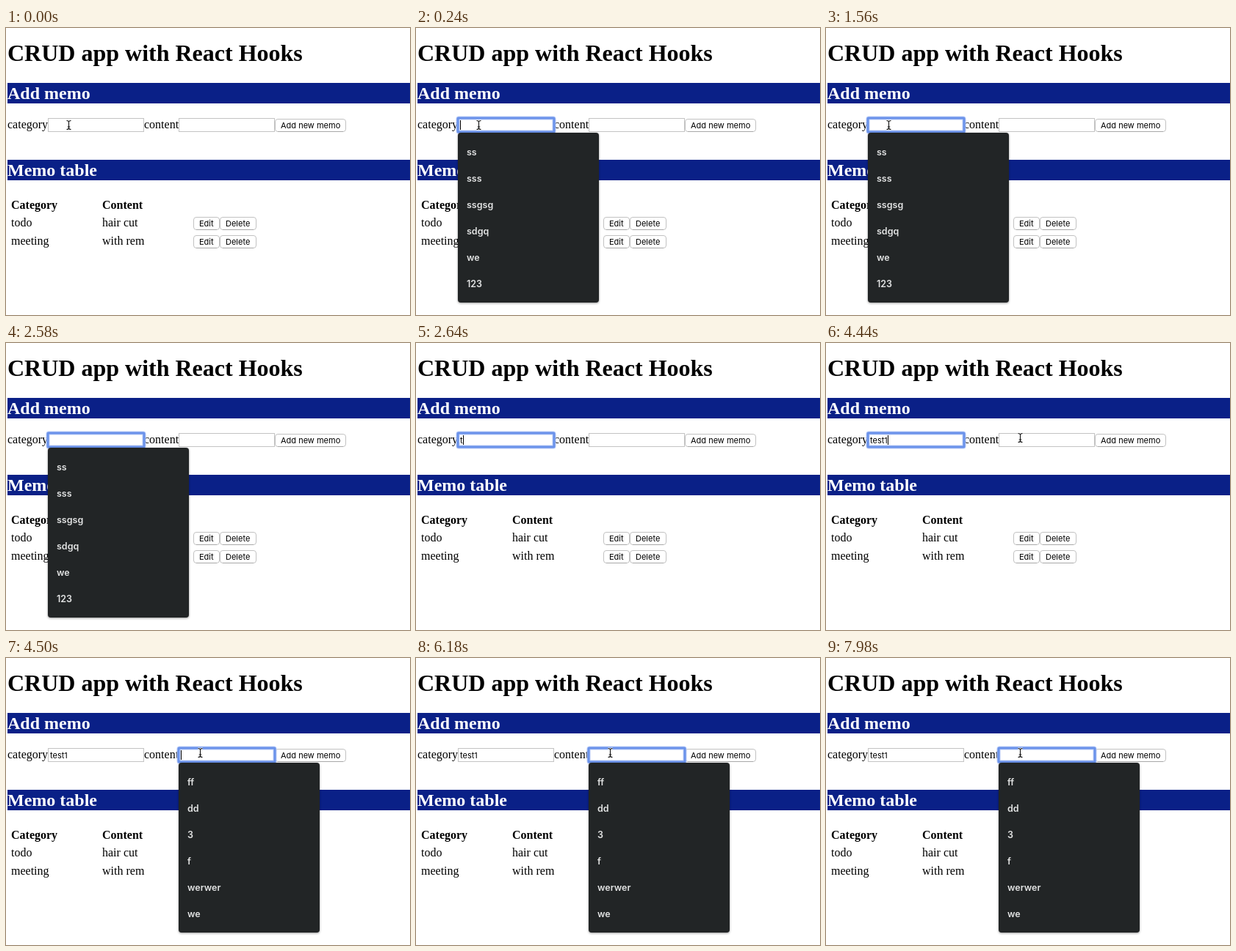
These frames come from a looping animation (550x392 px, 8000 ms). An HTML page:

```html
<!DOCTYPE html>
<html lang="en">
<head>
<meta charset="utf-8">
<title>Memo app</title>
<style>
html, body { margin: 0; width: 550px; height: 392px; overflow: hidden; background: #fff; }
svg { display: block; }
text { white-space: pre; }
.serif { font: 16px "Liberation Serif", Times, serif; }
.bold { font-weight: 700; }
.h1 { font-size: 32px; }
.h2 { font-size: 24px; fill: #fff; }
.bar { fill: #0a2087; }
.ui { font: 11px Inter, "Open Sans", sans-serif; }
.item { font: 600 12.5px Inter, "Open Sans", sans-serif; fill: #e2e3e3; }
.field { fill: #fff; stroke: #c3c3c3; }
.button { fill: #fff; stroke: #c2c2c2; }
.edge { stroke: #a8a8a8; }
.halo { fill: none; stroke: #b9ccf7; stroke-width: 5; }
.ring { fill: none; stroke: #6a92ea; stroke-width: 3; }
.panel { fill: #222526; filter: drop-shadow(0 1px 1.5px rgba(0, 0, 0, .4)); }
.beam { fill: none; stroke: #fff; stroke-width: 2.6; }
.beam + .beam { stroke: #111; stroke-width: 1.1; }
</style>
</head>
<body>
<svg id="stage" width="550" height="392" viewBox="0 0 550 392">
  <g class="serif">
    <text class="bold h1" x="2" y="45">CRUD app with React Hooks</text>
    <rect class="bar" x="2" y="75" width="548" height="28"/>
    <text class="bold h2" x="2" y="97">Add memo</text>
    <text x="2" y="137">category</text>
    <text x="188" y="137">content</text>
    <rect class="bar" x="2" y="180" width="548" height="28"/>
    <text class="bold h2" x="2" y="202">Memo table</text>
    <text class="bold" x="7" y="247">Category</text>
    <text class="bold" x="131" y="247">Content</text>
    <text x="7" y="271">todo</text>
    <text x="131" y="271">hair cut</text>
    <text x="7" y="296">meeting</text>
    <text x="131" y="296">with rem</text>
  </g>
  <rect class="field" x="57.5" y="123.5" width="130" height="18"/>
  <rect class="field" x="235.5" y="123.5" width="130" height="18"/>
  <g id="buttons"></g>
  <g id="focus">
    <rect class="halo" x="57" y="123" width="131" height="19" rx="1"/>
    <rect class="ring" x="57" y="123" width="131" height="19" rx="1"/>
  </g>
  <text id="typed" class="ui" x="60" y="137"></text>
  <rect id="caret" y="126" width="1" height="13"/>
  <g id="menus"></g>
  <g id="mouse">
    <path class="beam" d="M-3-6Q0-6 0-4V4Q0 6-3 6M3-6Q0-6 0-4V4Q0 6 3 6M-1.8 2.5H1.8"/>
    <path class="beam" d="M-3-6Q0-6 0-4V4Q0 6-3 6M3-6Q0-6 0-4V4Q0 6 3 6M-1.8 2.5H1.8"/>
  </g>
</svg>
<script>
const LOOP = 8000, TICK = 60;
const OPEN_A = 240, TYPE = 2640, MOVE = 4020, ARRIVE = 4440, OPEN_B = 4500;
const HIDE_MOUSE = 2580;
const KEYS = [2640, 2820, 3000, 3120, 3420];
const WORD = "test1";
// Each entry flips the caret, starting from hidden.
const BLINKS = [240, 660, 1080, 1560, 1980, 2460, 2640, 3840, 4320,
                4920, 5400, 5880, 6300, 6720, 7200, 7620];

const $ = id => document.getElementById(id);
const passed = (times, t) => times.filter(x => x <= t).length;
const show = (el, on) => el.setAttribute("visibility", on ? "visible" : "hidden");

function addButton(x, y, width, label) {
  $("buttons").insertAdjacentHTML("beforeend",
    `<rect class="button" x="${x + .5}" y="${y + .5}" width="${width - 1}" height="17" rx="3.5"/>
     <path class="edge" d="M${x + 4} ${y + 17.5}h${width - 8}"/>
     <text class="ui" x="${x + 8}" y="${y + 13}">${label}</text>`);
}

function addMenu(x, words) {
  const items = words.map((word, i) =>
    `<text class="item" x="${x + 12}" y="${174 + 36 * i}">${word}</text>`).join("");
  $("menus").insertAdjacentHTML("beforeend",
    `<g><rect class="panel" x="${x}" y="143" width="192" height="232" rx="4"/>${items}</g>`);
  return $("menus").lastElementChild;
}

addButton(366, 124, 97, "Add new memo");
for (const y of [258, 283]) {
  addButton(255, y, 36, "Edit");
  addButton(291, y, 50, "Delete");
}
const menuA = addMenu(57, ["ss", "sss", "ssgsg", "sdgq", "we", "123"]);
const menuB = addMenu(235, ["ff", "dd", "3", "f", "werwer", "we"]);

function draw(t) {
  const second = t >= OPEN_B;
  show(menuA, t >= OPEN_A && t < TYPE);
  show(menuB, second);
  show($("focus"), t >= OPEN_A);
  $("focus").setAttribute("transform", `translate(${second ? 178 : 0})`);

  const typed = $("typed");
  typed.textContent = WORD.slice(0, passed(KEYS, t));
  const end = typed.textContent ? Math.round(60 + typed.getComputedTextLength()) : 60;
  $("caret").setAttribute("x", second ? 238 : end);
  show($("caret"), passed(BLINKS, t) % 2 === 1);

  const step = Math.floor(t / TICK) * TICK;
  const p = Math.min(1, Math.max(0, (step - MOVE) / (ARRIVE - MOVE)));
  const ease = p * p * (3 - 2 * p);
  const x = Math.round(85 + 179 * ease) + .5;
  const y = Math.round(132 - 3 * ease) + .5;
  $("mouse").setAttribute("transform", `translate(${x} ${y})`);
  show($("mouse"), t < HIDE_MOUSE || t >= MOVE);
}

let start;
function frame(now) {
  start ??= now;
  draw((now - start) % LOOP);
  requestAnimationFrame(frame);
}
draw(0);
requestAnimationFrame(frame);
</script>
</body>
</html>
```
